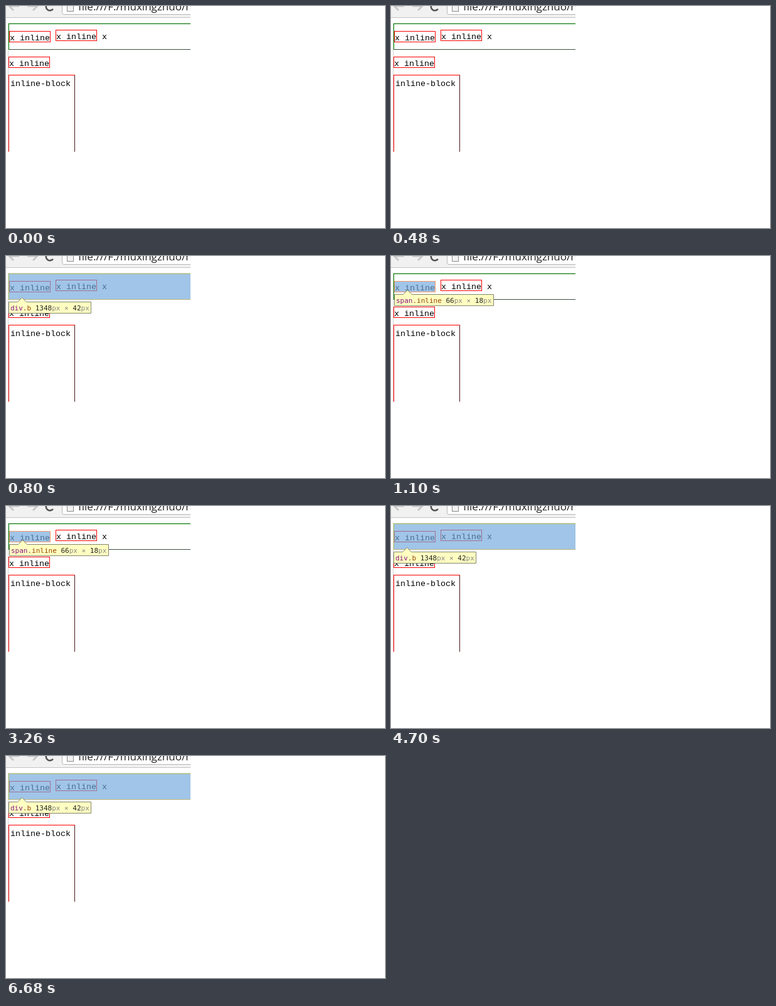
Animation of 604 by 355 pixels, one loop 8 s. Source, as an HTML page with a canvas:

```html
<!DOCTYPE html>
<html lang="en">
<head>
<meta charset="utf-8">
<style>
  html, body { margin: 0; width: 604px; height: 355px; overflow: hidden; background: #fff; }
  canvas { display: block; }
</style>
</head>
<body>
<canvas id="stage" width="604" height="355"></canvas>
<script>
const ctx = document.getElementById('stage').getContext('2d');
const LOOP = 8000;
const PAGE_FONT = '13.333px "Liberation Mono", monospace';
const TIP_FONT = '11px "DejaVu Sans Mono", monospace';
const URL_FONT = '17px "Open Sans", sans-serif';
const RED = '#f00';
const GREEN = '#008000';

// Inspected element over time: [start, key]
const steps = [[0, null], [800, 'div'], [1100, 'span'], [4700, 'div']];

const targets = {
  div: {
    box: [4, 28, 1348, 42], tip: [4, 73, 132, 19], apex: [25, 66],
    label: [['div', '#881280'], ['.b', '#994500'], [' 1348', '#222'],
            ['px', '#888'], [' × ', '#888'], ['42', '#222'], ['px', '#888']]
  },
  span: {
    box: [5, 40, 66, 18], tip: [5, 61, 159, 19], apex: [26, 54],
    label: [['span', '#881280'], ['.inline', '#994500'], [' 66', '#222'],
            ['px', '#888'], [' × ', '#888'], ['18', '#222'], ['px', '#888']]
  }
};

function rect(x, y, w, h, color) {
  ctx.fillStyle = color;
  ctx.fillRect(x, y, w, h);
}

function frame(x, y, w, h, color) {
  ctx.strokeStyle = color;
  ctx.lineWidth = 1;
  ctx.strokeRect(x + 0.5, y + 0.5, w - 1, h - 1);
}

function text(str, x, y, font, color) {
  ctx.font = font;
  ctx.fillStyle = color;
  ctx.fillText(str, x, y);
}

function line(points, color, width) {
  ctx.beginPath();
  points.forEach(([x, y]) => ctx.lineTo(x, y));
  ctx.strokeStyle = color;
  ctx.lineWidth = width;
  ctx.stroke();
}

function arrow(tip, tail, dir) {
  line([[tip, 0], [tail, 0]], '#c6c6c6', 3);
  line([[tip + 7 * dir, -7], [tip, 0], [tip + 7 * dir, 7]], '#c6c6c6', 2.6);
}

function toolbar() {
  rect(0, 0, 294, 18, '#f1f1f1');
  rect(0, 18, 294, 1, '#c3c3c3');
  arrow(5, 21, 1);
  arrow(50, 34, -1);

  ctx.beginPath();
  ctx.arc(70, 1, 6.2, 0.65, Math.PI * 1.8);
  ctx.strokeStyle = '#555';
  ctx.lineWidth = 2.6;
  ctx.stroke();

  ctx.beginPath();
  ctx.roundRect(89.5, -10.5, 240, 24, 3);
  ctx.fillStyle = '#fff';
  ctx.fill();
  ctx.strokeStyle = '#b5b5b5';
  ctx.lineWidth = 1;
  ctx.stroke();

  rect(97, -4, 11, 13, '#f2f2f2');
  frame(97, -4, 11, 13, '#8a8a8a');
  text('file:///F:/muxingzhuo/n', 115, 7, URL_FONT, '#222');
}

function inlineBox(x, y) {
  frame(x, y, 66, 18, RED);
  text('x inline', x + 1, y + 15, PAGE_FONT, '#000');
}

function page() {
  rect(3, 27, 1, 206, '#d2d2d2');
  rect(3, 27, 291, 1, '#d2d2d2');

  rect(4, 28, 290, 1, GREEN);
  rect(4, 28, 1, 42, GREEN);
  rect(5, 69, 289, 1, '#3a4f3e');

  inlineBox(5, 40);
  inlineBox(79, 38);
  text('x', 153, 53, PAGE_FONT, '#000');
  inlineBox(4, 81);

  rect(4, 110, 106, 1, RED);
  rect(4, 110, 1, 123, RED);
  rect(109, 111, 1, 122, '#4a1414');
  text('inline-block', 7, 128, PAGE_FONT, '#000');
}

function highlight([x, y, w, h]) {
  rect(x + 1, y + 1, w - 2, h - 2, 'rgba(111,168,220,0.66)');
  frame(x, y, w, h, 'rgba(255,229,153,0.66)');
}

function tooltip({ tip: [x, y, w, h], apex: [ax, ay], label }) {
  const left = x + 0.5, top = y + 0.5, right = x + w - 0.5, bottom = y + h - 0.5;
  ctx.beginPath();
  ctx.moveTo(left, top);
  ctx.lineTo(ax - 6.5, top);
  ctx.lineTo(ax + 0.5, ay + 0.5);
  ctx.lineTo(ax + 7.5, top);
  ctx.lineTo(right, top);
  ctx.lineTo(right, bottom);
  ctx.lineTo(left, bottom);
  ctx.closePath();
  ctx.fillStyle = '#ffffc2';
  ctx.fill();
  ctx.strokeStyle = '#85856c';
  ctx.lineWidth = 1;
  ctx.stroke();

  let pen = x + 3;
  for (const [str, color] of label) {
    text(str, pen, y + 14, TIP_FONT, color);
    pen += ctx.measureText(str).width;
  }
}

function draw(now) {
  const t = now % LOOP;
  const key = steps.filter(([start]) => start <= t).pop()[1];

  rect(0, 0, 604, 355, '#fff');
  ctx.save();
  ctx.beginPath();
  ctx.rect(0, 0, 294, 233);
  ctx.clip();
  toolbar();
  page();
  if (key) {
    highlight(targets[key].box);
    tooltip(targets[key]);
  }
  ctx.restore();
}

const begin = performance.now();
function tick() {
  draw(performance.now() - begin);
  requestAnimationFrame(tick);
}
tick();
</script>
</body>
</html>
```
